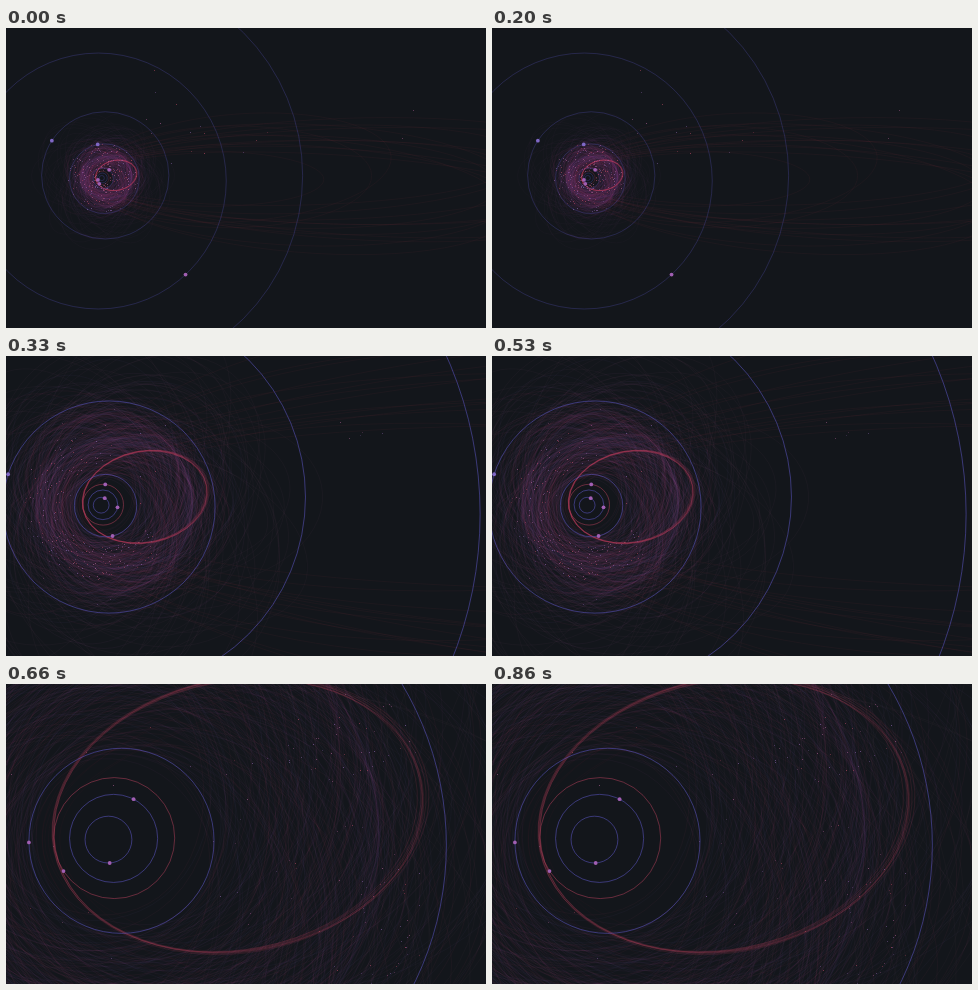
Recreate the animation shown at these times as an HTML page with a canvas. Size 480 px wide and 300 px high, loop 0.99 s.

```html
<!DOCTYPE html>
<html lang="en">
<head>
<meta charset="utf-8">
<title>Comet orbits</title>
<style>
html, body { margin: 0; width: 100%; height: 100%; overflow: hidden; background: #13161b; }
canvas { display: block; width: 480px; height: 300px; }
</style>
</head>
<body>
<canvas id="stage" width="480" height="300"></canvas>
<script>
const W = 480, H = 300, HOLD = 330, TAU = Math.PI * 2;
const BLUE = '92,86,196', RED = '172,62,88';

function seeded(s) {
  const rand = () => {
    s = (s + 0x6D2B79F5) | 0;
    let t = Math.imul(s ^ (s >>> 15), 1 | s);
    t = (t + Math.imul(t ^ (t >>> 7), 61 | t)) ^ t;
    return ((t ^ (t >>> 14)) >>> 0) / 4294967296;
  };
  const span = (lo, hi) => lo + (hi - lo) * rand();
  const pick = list => list[Math.floor(rand() * list.length)];
  return { rand, span, pick };
}

// One solar system in AU, sun at 0,0. Each planet: orbit radius and centre offset.
const planets = {
  mercury: { r: 0.387, x: -0.075, y: 0.01 },
  venus: { r: 0.728, x: 0.01, y: -0.01 },
  earth: { r: 1, x: 0.02, y: -0.015, color: RED },
  mars: { r: 1.53, x: 0.14, y: 0.03 },
  jupiter: { r: 5.2, x: 0.31, y: 0.1 },
  saturn: { r: 9.5, x: 0.44, y: -0.39 },
  uranus: { r: 19.1, x: -0.6, y: 0.45 },
  neptune: { r: 30.2, x: -0.3, y: -0.35 }
};

// Comet path: perihelion q, aphelion Q, direction of aphelion, flattening by tilt
function orbit(q, Q, dir, flat, color) {
  const a = (q + Q) / 2, c = (Q - q) / 2;
  return { a, b: Math.sqrt(q * Q) * flat, x: c * Math.cos(dir), y: c * Math.sin(dir), dir, color };
}

const many = (n, make) => Array.from({ length: n }, make);
const { rand, span, pick } = seeded(41);
const tints = ['168,72,108', '142,76,138', '105,82,148'];

const comets = {
  distant: many(14, () => orbit(span(0.8, 2.2), span(33, 90), span(-0.08, 0.1), span(0.6, 1), '150,55,72')),
  halo: many(60, () => orbit(span(1.5, 5), span(6, 11), span(0, TAU), span(0.8, 1), '125,82,110')),
  swarm: many(240, () => orbit(span(1.2, 3.3), 4.4 + 3 * rand() ** 3,
    -0.3 + span(-1.7, 1.7) + span(-1.7, 1.7), span(0.88, 1), pick(tints))),
  stream: many(8, () => orbit(span(0.95, 1), span(5.1, 5.32), span(-0.2, -0.17), span(0.985, 1), '195,66,98'))
};

// at: planet angles in degrees. dots: count, angle range, distance range in px
const views = [
  {
    sun: [96.3, 150], scale: 6.7, ring: 0.28,
    alpha: { distant: 0.09, halo: 0.05, swarm: 0.06, stream: 0.17 },
    at: { venus: 156, earth: 118, mars: -55, jupiter: -101, saturn: -147, uranus: 47 },
    dots: [[230, 0, TAU, 6, 35], [12, -1.3, -0.15, 50, 120], [5, -0.3, -0.1, 140, 330]]
  },
  {
    sun: [96.7, 149], scale: 20.4, ring: 0.55,
    alpha: { distant: 0.09, halo: 0.075, swarm: 0.075, stream: 0.21 },
    at: { mercury: -63, venus: 10, earth: -84, mars: 77, jupiter: -162 },
    dots: [[120, 0.5, 2.6, 42, 74], [75, 2.6, 4.9, 40, 80], [25, 0, TAU, 28, 110], [5, -0.5, -0.25, 230, 290]]
  },
  {
    sun: [107, 155], scale: 60.5, ring: 0.55,
    alpha: { distant: 0.06, halo: 0.07, swarm: 0.07, stream: 0.18 },
    at: { mercury: 87, venus: -63, earth: 147, mars: 179 },
    dots: [[40, 0.1, 0.55, 250, 330], [36, -0.5, -0.25, 190, 320], [35, -0.6, 0.6, 120, 320], [12, 0, TAU, 50, 130]]
  }
];

function paint(view, index) {
  const cv = document.createElement('canvas');
  cv.width = W;
  cv.height = H;
  const g = cv.getContext('2d');
  const rng = seeded(90 + index);
  const [sx, sy] = view.sun, k = view.scale;

  function ellipse(x, y, a, b, dir, color, alpha) {
    g.strokeStyle = `rgba(${color},${alpha})`;
    g.beginPath();
    g.ellipse(sx + x * k, sy + y * k, a * k, b * k, dir, 0, TAU);
    g.stroke();
  }

  g.fillStyle = '#13161b';
  g.fillRect(0, 0, W, H);

  g.lineWidth = 0.85;
  for (const group in comets) {
    for (const o of comets[group]) ellipse(o.x, o.y, o.a, o.b, o.dir, o.color, view.alpha[group]);
  }

  g.lineWidth = 1;
  for (const p of Object.values(planets)) {
    ellipse(p.x, p.y, p.r, p.r, 0, p.color || BLUE, view.ring);
  }

  for (const [n, a0, a1, r0, r1] of view.dots) {
    for (let i = 0; i < n; i++) {
      const a = rng.span(a0, a1), r = rng.span(r0, r1);
      g.fillStyle = `rgba(${rng.pick(['195,80,105', '180,100,155', '145,105,180'])},${rng.span(0.25, 0.65)})`;
      g.fillRect(Math.round(sx + Math.cos(a) * r), Math.round(sy + Math.sin(a) * r), 1, 1);
    }
  }

  for (const name in view.at) {
    const p = planets[name], a = view.at[name] * Math.PI / 180;
    g.fillStyle = p.r > 5 && p.r < 10 ? '#8068c6' : '#a15fb3';
    g.beginPath();
    g.arc(sx + (p.x + p.r * Math.cos(a)) * k, sy + (p.y + p.r * Math.sin(a)) * k, 1.9, 0, TAU);
    g.fill();
  }
  return cv;
}

const scenes = views.map(paint);
const ctx = document.getElementById('stage').getContext('2d');
const start = performance.now();

function draw(now) {
  const t = Math.max(0, now - start);
  ctx.drawImage(scenes[Math.floor(t / HOLD) % scenes.length], 0, 0);
  requestAnimationFrame(draw);
}
draw(start);
</script>
</body>
</html>
```
